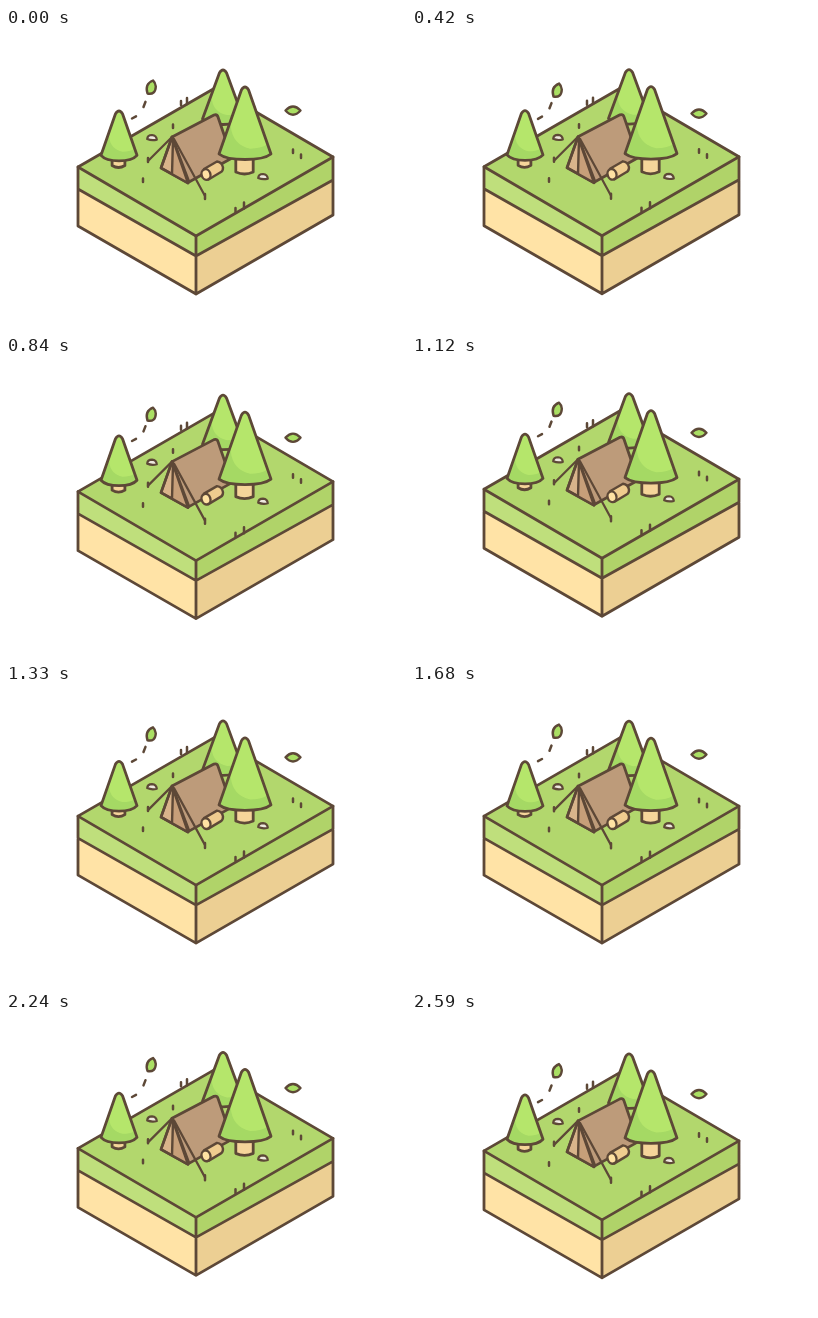
Write an HTML page that moves like this. It is 400 by 300 pixels and loops after 2620 ms.

```html
<!DOCTYPE html>
<html lang="en">
<head>
<meta charset="utf-8">
<title>Floating camp</title>
<style>
  html, body { margin: 0; width: 100%; height: 100%; overflow: hidden; background: #fff; }
  svg { display: block; width: 100vw; height: 100vh; }
</style>
</head>
<body>
<svg id="stage" viewBox="0 0 400 300" fill="none" stroke="#5d4837" stroke-width="2.8" stroke-linecap="round" stroke-linejoin="round"></svg>
<script>
const LOOP = 2620, STEP = 70;
const stage = document.getElementById('stage');
const layers = [];

const path = (d, fill = 'none', extra = '') => `<path d="${d}" fill="${fill}" ${extra}/>`;
const flat = (d, fill) => path(d, fill, 'stroke="none"');

// amp: half the vertical travel; peak: time of the lowest point
function layer(amp, peak, markup) {
  const g = document.createElementNS('http://www.w3.org/2000/svg', 'g');
  g.innerHTML = markup;
  stage.appendChild(g);
  layers.push({ g, amp, peak });
}
const ground = markup => layer(3.8, 190, markup);

function cone(x, top, base, w) {
  const d = `M${x - w} ${base}L${x - 3.6} ${top + 3}Q${x} ${top - 3} ${x + 3.6} ${top + 3}` +
    `L${x + w} ${base}C${x + w * .65} ${base + 7.3} ${x - w * .65} ${base + 7.3} ${x - w} ${base}Z`;
  const h = base - top;
  const shade = `M${x - w} ${base}L${x - w * .55} ${base - h * .43}` +
    `Q${x - w * .5} ${base - h * .14} ${x + w * .2} ${base - h * .08}` +
    `Q${x + w * .6} ${base - h * .08} ${x + w * .86} ${base - h * .14}L${x + w} ${base}` +
    `C${x + w * .65} ${base + 7.3} ${x - w * .65} ${base + 7.3} ${x - w} ${base}Z`;
  return flat(d, '#b5e66b') + flat(shade, '#a5d964') + path(d);
}

const trunk = (x, w, top, bottom) =>
  path(`M${x - w} ${top}V${bottom - 2}Q${x} ${bottom + 2} ${x + w} ${bottom - 2}V${top}Z`, '#f5d59a');

const ticks = list => path(list.map(([x, y, h]) => `M${x} ${y}v${h}`).join(''), 'none', 'stroke-width="2.5"');

const rock = (x, y) =>
  path(`M${x - 4.8} ${y + 1}Q${x - 4.5} ${y - 3} ${x} ${y - 3}Q${x + 4.5} ${y - 2.5} ${x + 4.8} ${y + 1.6}` +
    `Q${x} ${y + 3} ${x - 4.8} ${y + 1}Z`, '#eee9df', 'stroke-width="2.2"');

ground(
  flat('M72 139L190 208V228L72 161Z', '#bfdf7c') +
  flat('M190 208L327 129V152L190 228Z', '#b0d369') +
  flat('M72 161L190 228V266L72 198Z', '#ffe3a6') +
  flat('M190 228L327 152V187L190 266Z', '#eccf93') +
  path('M72 139L209 60L327 129L190 208Z', '#b2d76d') +
  path('M72 139V198L190 266L327 187V129M190 208V266M72 161L190 228L327 152') +
  ticks([[175, 73, 4], [181, 70, 6], [167, 96.5, 3.5], [137, 150.5, 3.5],
    [287, 121.5, 3.5], [295, 126.5, 3.5], [229.5, 180, 4], [238, 174.5, 6]]) +
  rock(146, 110) + rock(257, 149)
);

layer(2.7, 140, cone(217, 42, 91, 20.5));

ground(
  path('M166 109L208 87Q211 86 212 89L226 130L183 154Z', '#bd9b7a') +
  path('M166 109L155 140L182 155Z', '#d9b48b') +
  flat('M167 111L166 146L182 155Z', '#c79f79') +
  path('M166 109L155 140L182 155ZM167 111L166 146', 'none', 'stroke-width="2.4"') +
  path('M165 110L142 133M168 111L199 168', 'none', 'stroke-width="2.2"') +
  ticks([[142, 130, 4], [199, 166, 5]]) +
  path('M198 141L211 133.5Q216 134 217 139.5Q217 143 215 144L202.5 151.5Z', '#efcc8f', 'stroke-width="2.4"') +
  '<ellipse cx="200" cy="146.5" rx="4.4" ry="5.4" transform="rotate(-18 200 146.5)" fill="#ffe2a3" stroke-width="2.4"/>' +
  trunk(238.5, 8.7, 126, 146) + trunk(112.5, 6.4, 126, 139.5)
);

layer(2.7, 140, cone(239, 59, 126, 26));
layer(3, 150, cone(113, 83, 127.3, 18));

layer(7.4, 230, path('M126 90.5L130 88.3', 'none', 'stroke-width="2.5"'));
layer(7, 290, path('M137.5 79L139.5 73.8', 'none', 'stroke-width="2.5"'));
layer(7.5, 390,
  path('M147 52.5Q138.5 56 141.5 65.5Q149.5 67 149.8 58.5Q149.3 54.5 147 52.5Z', '#aadf63', 'stroke-width="2.4"') +
  path('M279.5 82.5Q287 74.5 294.5 82.5Q287 91 279.5 82.5Z', '#aadf63', 'stroke-width="2.4"'));

const wave = ms => Math.cos(2 * Math.PI * ms / LOOP);

function draw(now) {
  const t = Math.floor((now % LOOP) / STEP) * STEP;
  for (const { g, amp, peak } of layers) {
    const y = amp * (wave(t - peak) - wave(peak));
    g.setAttribute('transform', `translate(0 ${y.toFixed(2)})`);
  }
}

let start;
function tick(now) {
  start ??= now;
  draw(now - start);
  requestAnimationFrame(tick);
}
draw(0);
requestAnimationFrame(tick);
</script>
</body>
</html>
```
